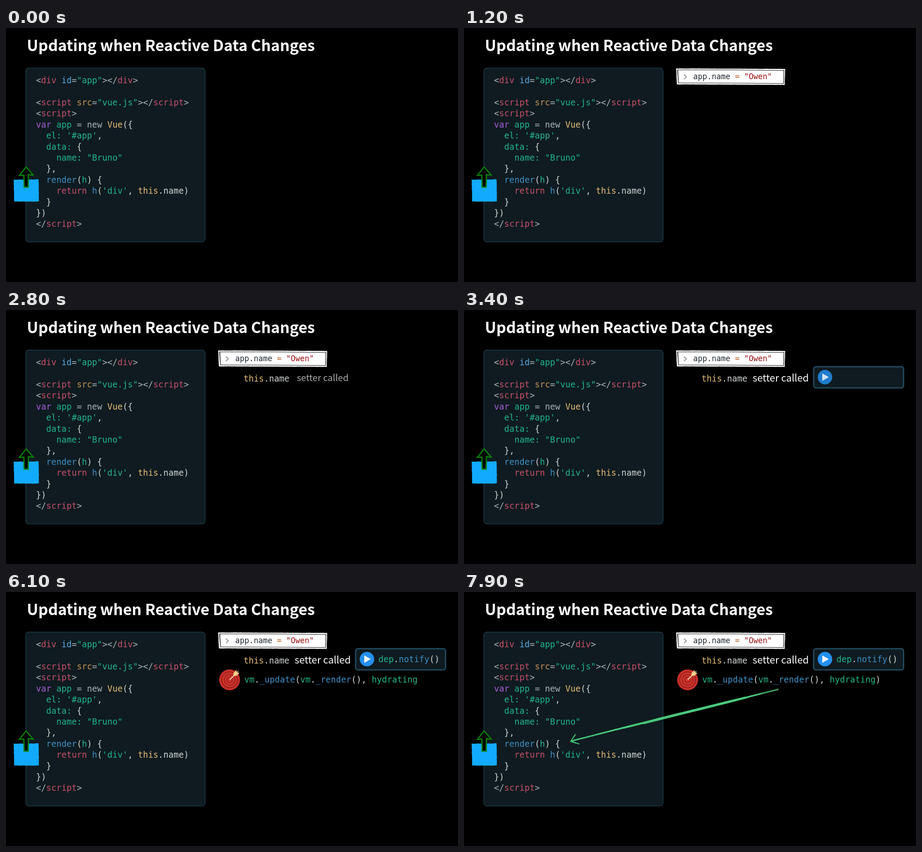
Animation, 998 px wide and 561 px high, one loop 8000 ms. Source, as an HTML page with a canvas:

```html
<!DOCTYPE html>
<html lang="en">
<head>
<meta charset="utf-8">
<title>Updating when Reactive Data Changes</title>
<style>
  html, body { margin: 0; width: 100%; height: 100%; overflow: hidden; background: #000; }
  canvas, svg { position: absolute; left: 0; top: 0; width: 998px; height: 561px; }
  text { white-space: pre; }
  .code { font: 18.7px "DejaVu Sans Mono", monospace; }
  .sans { font-family: "Noto Sans CJK JP", "Noto Sans CJK SC", "Noto Sans", sans-serif; fill: #fff; }
</style>
</head>
<body>
<canvas id="stage" width="998" height="561"></canvas>
<svg id="words" viewBox="0 0 998 561">
  <clipPath id="depClip"><rect id="depWipe" x="820" y="130" width="0" height="36"/></clipPath>
  <clipPath id="vmClip"><rect id="vmWipe" x="525" y="178" width="0" height="34"/></clipPath>
  <text class="sans" x="46" y="51.3" font-size="33.7" font-weight="700">Updating when Reactive Data Changes</text>
  <g id="listing"></g>
  <g id="prompt"></g>
  <g id="getter"></g>
  <text id="setter" class="sans" x="699.3" y="157.8" font-size="21.8" text-anchor="middle">setter called</text>
  <g id="dep" clip-path="url(#depClip)"></g>
  <g id="vm" clip-path="url(#vmClip)"></g>
</svg>
<script>
const LOOP = 8000, STEP = 100;
const ctx = document.getElementById('stage').getContext('2d');
const el = id => document.getElementById(id);

const inks = {
  p: '#a8b2b5', w: '#d0d3d2', r: '#c6506a', b: '#5ba9e2', s: '#22b48a', o: '#c6935c',
  v: '#a65cd6', y: '#e5bd78', f: '#3d8dc4', k: '#222a33', e: '#b5561c', q: '#980f12'
};

// "~x" switches to ink x
function write(parent, x, y, source, size) {
  const ns = 'http://www.w3.org/2000/svg';
  const line = document.createElementNS(ns, 'text');
  line.setAttribute('class', 'code');
  line.setAttribute('x', x);
  line.setAttribute('y', y);
  if (size) line.style.fontSize = size + 'px';
  for (const run of source.split('~').slice(1)) {
    const span = document.createElementNS(ns, 'tspan');
    span.setAttribute('fill', inks[run[0]]);
    span.textContent = run.slice(1);
    line.append(span);
  }
  el(parent).append(line);
}

[
  '~p<~rdiv~b id~p=~s"app"~p></~rdiv~p>',
  '',
  '~p<~rscript~o src~p=~s"vue.js"~p></~rscript~p>',
  '~p<~rscript~p>',
  '~vvar~s app~p = new ~yVue~w({',
  "~s  el: '#app'~w,",
  '~s  data: ~w{',
  '~s    name: "Bruno"',
  '~w  },',
  '~f  render~w(~sh~w) {',
  "~r    return~f h~w(~s'div'~w, ~ythis~w.name)",
  '~w  }',
  '~w})',
  '~p</~rscript~p>'
].forEach((s, i) => write('listing', 66.2, 122.2 + 24.4 * i, s));

write('prompt', 506, 113, '~kapp.name ~e= ~q"Owen"', 17);
write('getter', 524.5, 158.3, '~ythis~w.name');
write('dep', 822.3, 155, '~sdep~w.~fnotify~w()');
write('vm', 526, 200, '~svm~w.~f_update~w(~svm~w.~f_render~w(), ~shydrating~w)');

const ramp = (t, a, b) => Math.min(1, Math.max(0, (t - a) / (b - a)));
const easeOut = (k, power = 2) => 1 - (1 - k) ** power;
const easeInOut = k => k * k * (3 - 2 * k);

function random(seed) {
  return () => (seed = (seed * 16807) % 2147483647) / 2147483647;
}

function poly(points, fill) {
  ctx.beginPath();
  points.forEach(p => ctx.lineTo(...p));
  ctx.closePath();
  ctx.fillStyle = fill;
  ctx.fill();
}

function strokeLine(points, color, width) {
  ctx.beginPath();
  points.forEach(p => ctx.lineTo(...p));
  ctx.strokeStyle = color;
  ctx.lineWidth = width;
  ctx.stroke();
}

function disc(x, y, r, fill) {
  ctx.beginPath();
  ctx.arc(x, y, r, 0, Math.PI * 2);
  ctx.fillStyle = fill;
  ctx.fill();
}

function panel(x, y, w, h, r, line, width) {
  ctx.beginPath();
  ctx.roundRect(x, y, w, h, r);
  ctx.fillStyle = '#0f1b20';
  ctx.fill();
  ctx.strokeStyle = line;
  ctx.lineWidth = width;
  ctx.stroke();
}

// Outline with slightly uneven edges
function rough(corners, amount, seed) {
  const rnd = random(seed), out = [];
  corners.forEach(([x, y], i) => {
    const [nx, ny] = corners[(i + 1) % corners.length];
    const n = Math.ceil(Math.hypot(nx - x, ny - y) / 5);
    for (let j = 0; j < n; j++) {
      out.push([x + (nx - x) * j / n + (rnd() - .5) * amount,
                y + (ny - y) * j / n + (rnd() - .5) * amount]);
    }
  });
  return out;
}

function fade(alpha, draw) {
  if (alpha <= 0) return;
  ctx.save();
  ctx.globalAlpha = alpha;
  draw();
  ctx.restore();
}

function uploadIcon() {
  poly(rough([[17, 335], [72, 334.3], [72.7, 383], [18, 383.5]], .8, 71), '#12aaff');
  poly([[44.5, 307], [60, 325], [49.5, 324], [49, 351.5], [40, 351.5], [39.5, 325], [29.5, 325.5]], '#030806');
  ctx.strokeStyle = '#078407';
  ctx.lineWidth = 2.6;
  ctx.stroke();
}

function promptBox() {
  poly(rough([[468.5, 89.3], [709.3, 90.3], [708, 125.7], [470, 124.5]], .3, 19), '#fff');
  strokeLine([[471.5, 92.6], [590, 92.6], [706.5, 93.8]], '#111', 1);
  strokeLine([[706.5, 93], [705.5, 122.5]], '#111', 1.2);
  strokeLine([[473, 121.3], [600, 121.8], [706, 122.6]], '#111', 1);
  poly([[470.8, 92], [472.6, 92], [474.2, 121.5], [473, 121.5]], '#111');
  strokeLine([[485.5, 103], [491, 108], [485.5, 113]], '#969696', 2);
}

function playButton() {
  disc(797, 148.2, 16, '#2490ee');
  poly([[791, 140], [791, 156.5], [805.5, 148.2]], '#f2f6fa');
}

function target() {
  const x = 493.7, y = 194;
  [[23, '#c9302a'], [18.6, '#971f1e'], [16.4, '#cf342c'], [12.8, '#971f1e'],
   [10.8, '#cf342c'], [7, '#971f1e'], [5, '#cf342c']]
    .forEach(([r, c]) => disc(x, y, r, c));
  strokeLine([[494, 193.5], [506, 182]], '#f5dfb4', 2.2);
  poly([[502, 185], [502.5, 178], [509, 172], [509.5, 177.5], [515.5, 178.5], [509.5, 185]], '#f2c477');
  strokeLine([[503, 184.5], [513, 174.5]], '#fff0cf', 1.5);
}

// Dry-brush stroke made of overlapping strands
function brush(a, b, width, strands, seed) {
  const rnd = random(seed);
  const dx = b[0] - a[0], dy = b[1] - a[1], len = Math.hypot(dx, dy);
  const at = (k, off) => [a[0] + dx * k - dy / len * off, a[1] + dy * k + dx / len * off];
  for (let i = 0; i < strands; i++) {
    const full = i < 2;
    const from = full ? 0 : rnd() * .6;
    const to = full ? 1 : Math.min(1, from + .15 + rnd() * .3);
    const off = full ? (i - .5) * width * .5 : (rnd() - .5) * width;
    const bend = (rnd() - .5) * width * .3;
    const pts = [];
    for (let j = 0; j <= 12; j++) {
      const k = from + (to - from) * j / 12;
      const taper = .5 + .5 * Math.sin(Math.PI * k);
      pts.push(at(k, (off + bend * Math.sin(k * 7)) * taper));
    }
    strokeLine(pts, '#4acd7d', full ? 1.4 : .6 + rnd() * .8);
  }
}

function renderArrow(k) {
  if (k <= 0) return;
  const left = 698 - 468 * k;
  ctx.save();
  ctx.beginPath();
  ctx.rect(left, 205, 700 - left, 140);
  ctx.clip();
  ctx.lineCap = 'round';
  brush([694, 215], [238, 328.7], 4.8, 22, 4711);
  brush([246, 314.5], [235.5, 330], 1.6, 4, 53);
  brush([235.5, 330], [254, 335.5], 2, 5, 97);
  ctx.restore();
}

function draw(t) {
  ctx.fillStyle = '#000';
  ctx.fillRect(0, 0, 998, 561);
  panel(43.7, 88.5, 395.8, 384, 7, '#1d3d4a', 1.4);
  uploadIcon();

  const box = ramp(t, 900, 1200);
  fade(box, promptBox);
  el('prompt').style.opacity = box;
  el('getter').style.opacity = ramp(t, 2200, 2500);

  const pop = ramp(t, 2600, 2900), s = easeOut(pop, 2.3);
  el('setter').style.opacity = pop;
  el('setter').setAttribute('transform', `translate(699.3 150) scale(${s}) translate(-699.3 -150)`);

  fade(ramp(t, 3000, 3300), () => panel(772, 125.3, 198.5, 46.7, 5, '#21485a', 3));
  fade(ramp(t, 3150, 3450), playButton);
  el('depWipe').setAttribute('width', 142 * easeOut(ramp(t, 3450, 4000)));

  fade(ramp(t, 5400, 5600), target);
  el('vmWipe').setAttribute('width', 396 * easeOut(ramp(t, 5600, 6200)));
  renderArrow(easeInOut(ramp(t, 6900, 7500)));
}

let last = -1;
function tick(now) {
  const t = Math.floor(now % LOOP / STEP) * STEP;
  if (t !== last) draw(last = t);
  requestAnimationFrame(tick);
}
draw(0);
requestAnimationFrame(tick);
</script>
</body>
</html>
```
